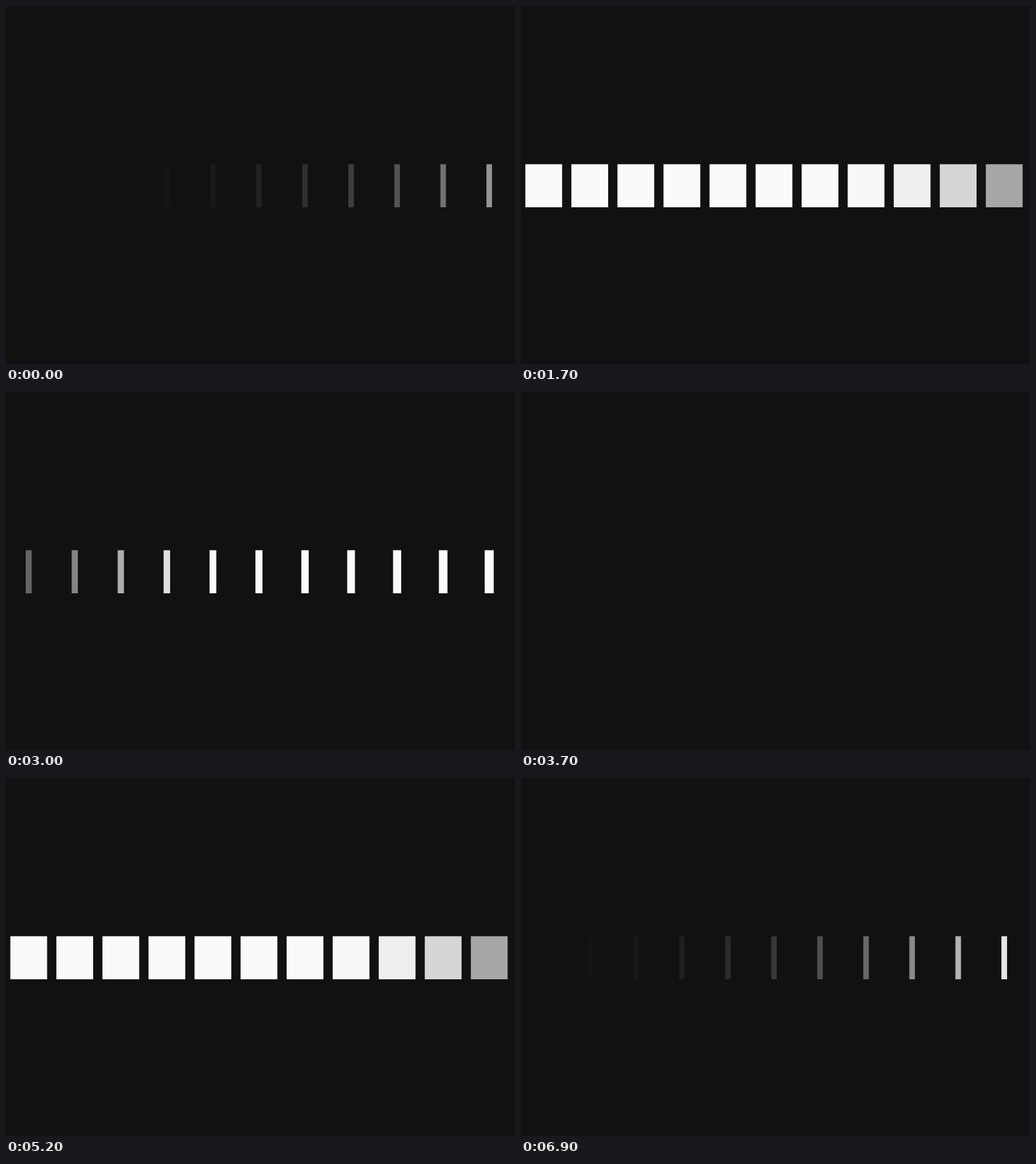
Animation, 800 px wide and 562 px high, one loop 7 s. Source, as an HTML page with a canvas:

```html
<!DOCTYPE html>
<html lang="en">
<head>
<meta charset="utf-8">
<title>Bars</title>
<style>
  html, body { margin: 0; width: 100%; height: 100%; overflow: hidden; background: #111; }
  canvas { display: block; }
</style>
</head>
<body>
<canvas id="stage" width="800" height="562"></canvas>
<script>
const ctx = document.getElementById('stage').getContext('2d');

const STEP = 100, CYCLE = 3500, RESET = 200;
const BARS = 11, FIRST_X = 35.7, PITCH = 72.38;
const TOP = 248.4, HEIGHT = 67.6, WIDE = 57.8, NARROW = 8.7;

// Start of the first bar, delay per bar, duration (ms) and ease-out power
const appear = { start: 1318.7, lag: 32.7, length: 187, power: 3 };
const shrink = { start: 1940, lag: 30.8, length: 1290, power: 2.5 };
const fade = { start: 2798, lag: 58, length: 700, power: 3 };

function progress(phase, bar, time) {
  const x = (time - phase.start - bar * phase.lag) / phase.length;
  return 1 - Math.pow(1 - Math.min(1, Math.max(0, x)), phase.power);
}

function draw(time) {
  ctx.globalAlpha = 1;
  ctx.fillStyle = '#111';
  ctx.fillRect(0, 0, 800, 562);
  ctx.fillStyle = '#fafafa';
  for (let i = 0; i < BARS; i++) {
    const width = WIDE + (NARROW - WIDE) * progress(shrink, i, time);
    ctx.globalAlpha = progress(appear, i, time) * (1 - progress(fade, i, time));
    ctx.fillRect(FIRST_X + i * PITCH - width / 2, TOP, width, HEIGHT);
  }
}

const origin = performance.now();

function tick() {
  const elapsed = Math.floor((performance.now() - origin) / STEP) * STEP;
  // The cycle restarts at RESET, cutting the last bars off mid-fade
  draw((elapsed - RESET + CYCLE) % CYCLE + RESET);
  requestAnimationFrame(tick);
}
tick();
</script>
</body>
</html>
```
